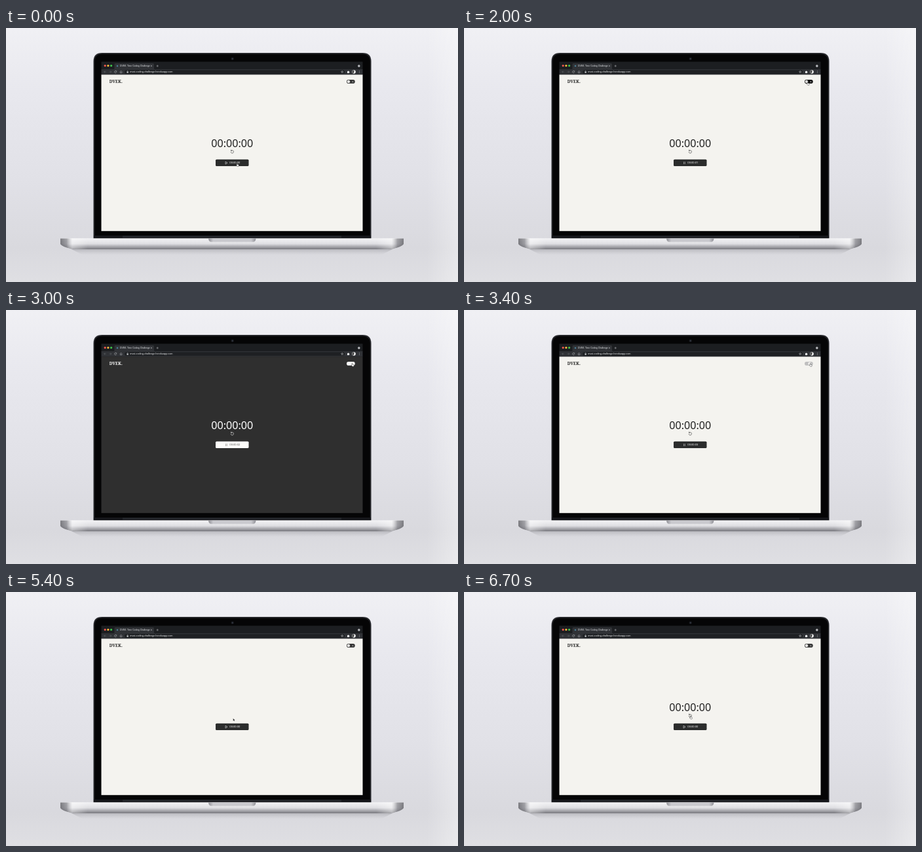
Animation, 690 px wide and 388 px high, one loop 7.3 s. Source, as an HTML page:

```html
<!DOCTYPE html>
<html lang="en">
<head>
<meta charset="utf-8">
<title>Time Coding Challenge</title>
<style>
  html, body { margin: 0; width: 100%; height: 100%; overflow: hidden; background: #e4e4e9; }
  svg { display: block; width: 690px; height: 388px; }
  text { font-family: "Liberation Sans", Arial, sans-serif; }
  .page { --bg: #f4f3ef; --fg: #222; --btn: #2b2c2c; --label: #fff; }
  .page.dark { --bg: #2f2f2f; --fg: #fff; --btn: #fdfcfa; --label: #555; }
  .bg { fill: var(--bg); }
  .brand { font: 700 6.3px "Noto Serif", serif; letter-spacing: .1px; fill: var(--fg); }
  .time { font-family: "Noto Sans", "Open Sans", sans-serif; text-anchor: middle; }
  #total { font-size: 16.1px; fill: var(--fg); }
  #session { font-size: 4px; fill: var(--label); }
  .btn { fill: var(--btn); }
  .icon { fill: none; stroke: var(--label); stroke-width: .5; }
  .reset { fill: none; stroke: var(--fg); stroke-width: .55; }
  .chrome { fill: none; stroke: #c4c7ca; stroke-width: .5; }
</style>
</head>
<body>
<svg viewBox="0 0 690 388">
  <defs>
    <linearGradient id="wall" x2="0" y2="1">
      <stop stop-color="#f0f0f4"/>
      <stop offset=".25" stop-color="#e8e8ee"/>
      <stop offset=".6" stop-color="#e1e1e7"/>
      <stop offset=".87" stop-color="#d9d9de"/>
      <stop offset="1" stop-color="#dfdfe3"/>
    </linearGradient>
    <linearGradient id="glow">
      <stop offset=".93" stop-color="#fff" stop-opacity="0"/>
      <stop offset="1" stop-color="#fff" stop-opacity=".35"/>
    </linearGradient>
    <linearGradient id="deck" x2="0" y2="1">
      <stop stop-color="#f3f3f5"/>
      <stop offset=".5" stop-color="#dedee2"/>
      <stop offset=".66" stop-color="#bcbcc1"/>
      <stop offset="1" stop-color="#77777d"/>
    </linearGradient>
    <linearGradient id="sheen">
      <stop stop-color="#55555b" stop-opacity=".75"/>
      <stop offset=".018" stop-color="#77777d" stop-opacity=".65"/>
      <stop offset=".035" stop-color="#fff" stop-opacity=".4"/>
      <stop offset=".08" stop-color="#fff" stop-opacity="0"/>
      <stop offset=".92" stop-color="#fff" stop-opacity="0"/>
      <stop offset=".965" stop-color="#fff" stop-opacity=".4"/>
      <stop offset=".982" stop-color="#77777d" stop-opacity=".65"/>
      <stop offset="1" stop-color="#55555b" stop-opacity=".75"/>
    </linearGradient>
    <linearGradient id="notch">
      <stop stop-color="#8f8f95"/>
      <stop offset=".1" stop-color="#c9c9ce"/>
      <stop offset=".9" stop-color="#c9c9ce"/>
      <stop offset="1" stop-color="#8f8f95"/>
    </linearGradient>
    <linearGradient id="shade" x2="0" y2="1">
      <stop stop-color="#85858b" stop-opacity=".45"/>
      <stop offset="1" stop-color="#b0b0b6" stop-opacity="0"/>
    </linearGradient>
  </defs>

  <rect width="690" height="388" fill="url(#wall)"/>
  <rect width="690" height="388" fill="url(#glow)"/>

  <!-- laptop -->
  <path d="M98 337H592L572 347H118Z" fill="url(#shade)"/>
  <path d="M133.5 322V51Q133.5 38 146.5 38H544.5Q557.5 38 557.5 51V322Z" fill="#27282c"/>
  <path d="M135.2 322V51.5Q135.2 39.7 147 39.7H544Q555.8 39.7 555.8 51.5V322Z" fill="#050506"/>
  <rect x="134" y="317" width="423" height="4.5" fill="#15161a"/>
  <rect x="178" y="317.4" width="334" height="3" fill="#24262b"/>
  <circle cx="345.7" cy="47" r="2.2" fill="#17191e"/>
  <circle cx="345.7" cy="47" r="1" fill="#363b46"/>
  <path id="base" d="M83 321.5H607V330Q602 336 582 338H108Q88 336 83 330Z" fill="url(#deck)"/>
  <use href="#base" style="fill:url(#sheen)"/>
  <path d="M83 321.5H607V330Q602 336 582 338H108Q88 336 83 330Z" fill="url(#sheen)"/>
  <path d="M309 321.5H381.5Q381 326.8 377 326.8H313.5Q309.5 326.8 309 321.5Z" fill="url(#notch)"/>

  <!-- browser -->
  <rect x="145.5" y="51.5" width="399" height="12" fill="#1c1e21"/>
  <rect x="145.5" y="63" width="399" height="8.5" fill="#303236"/>
  <path d="M164 63.2Q165.5 63 165.5 61.5V55.5Q165.5 54 167 54H224.5Q226 54 226 55.5V61.5Q226 63 227.5 63.2Z" fill="#303236"/>
  <circle cx="151.2" cy="57.6" r="1.6" fill="#f0584f"/>
  <circle cx="155.9" cy="57.6" r="1.6" fill="#f4bb3b"/>
  <circle cx="160.6" cy="57.6" r="1.6" fill="#3fc24a"/>
  <circle cx="170" cy="58" r="1.3" fill="#4a7d94"/>
  <text x="174" y="59.2" font-size="3.35" fill="#e8eaed">DVEK. Time Coding Challenge</text>
  <path class="chrome" d="M220.9 56.9l2 2m0-2l-2 2M229.6 58h3.2m-1.6-1.6v3.2"/>
  <circle cx="538.8" cy="58" r="1.7" fill="#d5d7da"/>
  <path d="M538 57.7h1.6l-.8 .9z" fill="#1c1e21"/>
  <rect x="181" y="64.2" width="336" height="5.8" rx="2.9" fill="#1e2023"/>
  <path class="chrome" d="M152.8 67h-3.2l1.4-1.4m-1.4 1.4l1.4 1.4M157.6 67h3.2l-1.4-1.4m1.4 1.4l-1.4 1.4" opacity=".4"/>
  <path class="chrome" d="M168.5 66.1a1.6 1.6 0 1 0 .2 1.4M168.8 65.2v1.2h-1.2M173.9 67l1.7-1.5l1.7 1.5M174.4 66.8v1.8h2.4v-1.8"/>
  <rect x="184.5" y="66.7" width="2.2" height="1.9" fill="#d5d7da"/>
  <path class="chrome" d="M184.9 66.8v-.7a.7.7 0 0 1 1.4 0v.7"/>
  <text x="189.3" y="68.3" font-size="3.8" fill="#f1f2f4">mvst-coding-challenge.herokuapp.com</text>
  <path class="chrome" d="M513.2 65.3l.5 1.1l1.2.1l-.9.8l.3 1.2l-1.1-.6l-1.1.6l.3-1.2l-.9-.8l1.2-.1z" stroke-width=".35"/>
  <path d="M521 65.9h1q.5-1.3 1 0h1v1q1.200.5 0 1v1h-3z" fill="#eceef0"/>
  <circle cx="531" cy="67" r="2.8" fill="#f0f0f0"/>
  <path d="M531 64.4a2.6 2.6 0 0 0-1.4 4.8q1.7-.3 1.8-2.200t-.4-2.600z" fill="#444"/>
  <g fill="#d5d7da">
    <circle cx="539.3" cy="65.6" r=".45"/><circle cx="539.3" cy="67" r=".45"/><circle cx="539.3" cy="68.4" r=".45"/>
  </g>

  <!-- page -->
  <g class="page" id="page">
    <rect class="bg" x="145.5" y="71.3" width="399" height="238.900"/>
    <text class="brand" x="157.700" y="84.2">DVEK.</text>
    <g id="toggle">
      <rect id="track" x="520" y="79.1" width="12.7" height="5.600" rx="2.800"/>
      <path id="moon" d="M529.700 80.800a1.100 1.100 0 1 0 .900 1.500a1 1 0 0 1-.900-1.500z" fill="#aaa"/>
      <circle id="knob" cy="81.900" r="2.450" fill="#fbfaf8" stroke-width=".5"/>
    </g>
    <g id="summary">
      <text class="time" id="total" x="345.300" y="181.700">00:00:00</text>
      <path class="reset" d="M343.700 187.500a2.200 2.200 0 1 1-.600 1.700M343.500 185.900v1.800h1.800"/>
    </g>
    <rect class="btn" x="320" y="200.700" width="50.500" height="10.300" rx="1.600"/>
    <path class="icon" id="play" d="M335 204.200V208L338 206.100Z"/>
    <path class="icon" id="pause" d="M335.500 204.300V207.900M337.300 204.300V207.900"/>
    <text class="time" id="session" x="349.300" y="207.400"></text>
  </g>

  <g id="cursor">
    <path id="arrow" d="M0 0V4L.9 3.200L1.600 4.600L2.300 4.300L1.700 2.900H2.900Z" fill="#111" stroke="#fff" stroke-width=".3"/>
    <path id="hand" d="M-.45 .4Q0-.2.45.4V2L2.400 2.500Q2.900 3 2.200 5H.1L-1.500 3Q-1.300 2.500-.45 2.900Z" fill="#fff" stroke="#111" stroke-width=".4"/>
  </g>
</svg>
<script>
  const LOOP = 7300, STEP = 100;
  const el = id => document.getElementById(id);
  const show = (id, on) => el(id).style.display = on ? '' : 'none';
  const within = (t, a, b) => t >= a && t < b;

  // time, x, y
  const path = [
    [0, 352.8, 206.3], [600, 352.8, 206.3], [900, 456, 178], [1000, 456, 178],
    [1800, 524, 82], [2000, 524.6, 82.3], [2800, 524.6, 82.3], [3000, 528.6, 81.2],
    [3400, 528.6, 81.2], [4100, 339, 184], [4300, 352.8, 206.3], [4900, 352.8, 206.3],
    [5300, 346.7, 193], [5400, 346.7, 193], [5700, 345.8, 189], [LOOP, 345.8, 189]
  ];
  const slide = [[0, 0], [2100, 0], [2200, .5], [2600, 1], [3300, 1], [3400, .7], [3700, 0], [LOOP, 0]];
  const ticks = [1300, 2300, 3400, 4300];
  const hands = [[0, 700], [1900, 3500], [4300, 5000], [5900, 6600], [6700, LOOP]];

  function sample(keys, t, ease = p => p) {
    const i = keys.findIndex(k => k[0] > t);
    const a = keys[i - 1], b = keys[i];
    const p = ease((t - a[0]) / (b[0] - a[0]));
    return a.slice(1).map((v, n) => v + (b[n + 1] - v) * p);
  }
  const smooth = p => p * p * (3 - 2 * p);
  const clock = s => '00:00:0' + s;

  function render(t) {
    const running = within(t, 200, 4600);
    show('pause', running);
    show('play', !running);
    el('session').textContent = clock(running ? ticks.filter(k => k <= t).length : 0);

    el('total').textContent = clock(within(t, 5400, 6600) ? 4 : 0);
    show('summary', !within(t, 5400, 5500) && !within(t, 6600, 6700));

    el('page').classList.toggle('dark', within(t, 2200, 3400));
    const [k] = sample(slide, t);
    const hover = within(t, 1900, 2200);
    const tone = Math.round((hover ? 14 : 52) + 198 * k);
    const color = `rgb(${tone},${tone},${tone})`;
    el('track').style.fill = color;
    el('knob').style.stroke = k > .9 ? '#d8d8d8' : color;
    el('knob').setAttribute('cx', 522.9 + 6.8 * k);
    show('moon', k < .4);

    const [x, y] = sample(path, t, smooth);
    el('cursor').setAttribute('transform', `translate(${x} ${y})`);
    const hand = hands.some(([a, b]) => within(t, a, b));
    show('hand', hand);
    show('arrow', !hand);
  }

  const start = performance.now();
  function frame() {
    const t = (performance.now() - start) % LOOP;
    render(Math.floor(t / STEP) * STEP);
    requestAnimationFrame(frame);
  }
  frame();
</script>
</body>
</html>
```
